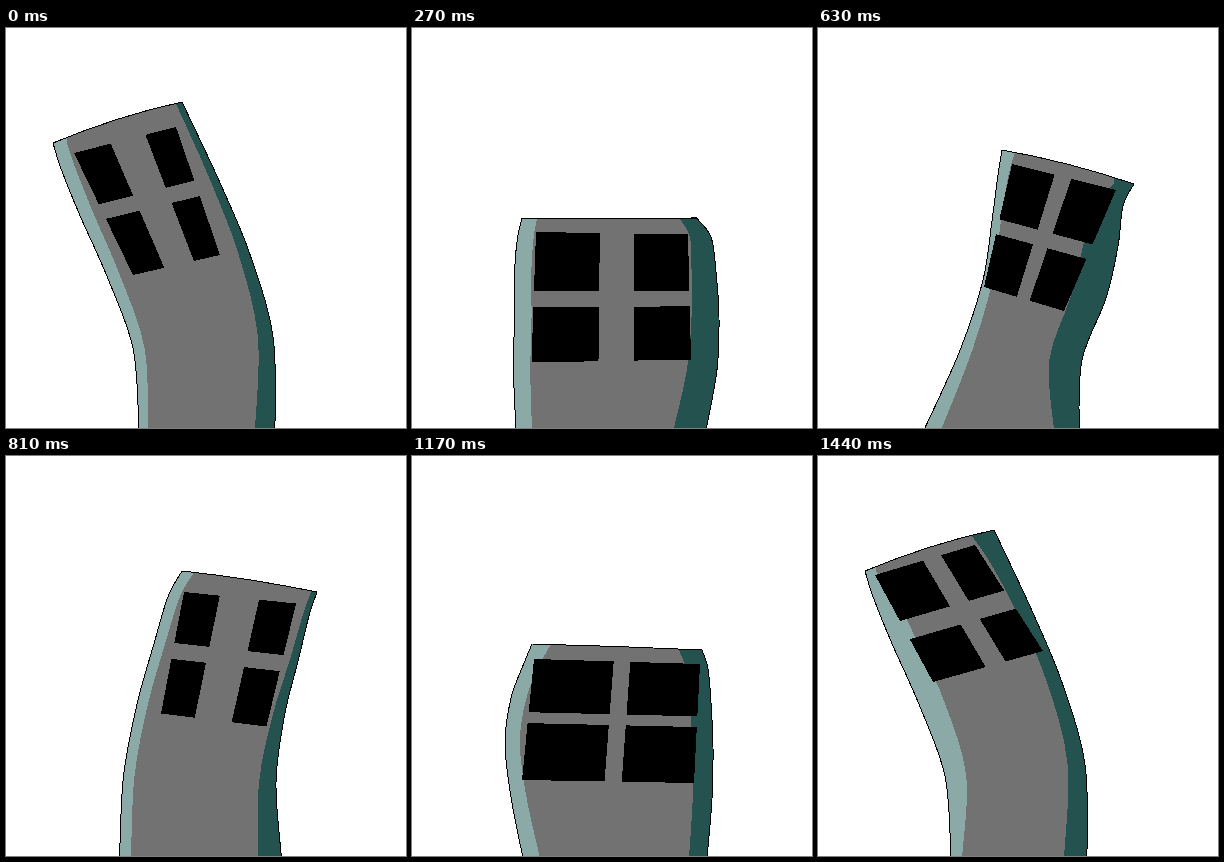
An HTML page for the animation above (1.53 s loop, 400 by 400 pixels).

```html
<!DOCTYPE html>
<html lang="en">
<head>
<meta charset="utf-8">
<title>Dancing tower</title>
<style>
html, body { margin: 0; width: 100%; height: 100%; overflow: hidden; background: #fff; }
svg { display: block; width: 100vw; height: 100vh; }
</style>
</head>
<body>
<svg viewBox="0 0 400 400" shape-rendering="crispEdges">
  <clipPath id="clip"><path id="clipShape"/></clipPath>
  <g clip-path="url(#clip)">
    <path id="wall" fill="#727272"/>
    <path id="light" fill="#8aa9a7"/>
    <path id="dark" fill="#24534f"/>
  </g>
  <path id="edge" fill="none" stroke="#000"/>
  <path id="panes" fill="#000"/>
</svg>
<script>
const STEP = 90, COUNT = 17, FLOOR = 402, MID = 397;

// left, right: height of the corner, then x at six levels down to the floor
// light, dark: width of the shaded side at top, middle and bottom
// block: corners of the window area, clockwise; gaps: its bars, across and down
const leanLeft = {
  left: [115, 47, 55, 74, 101, 127, 133], right: [74, 176, 190, 215, 244, 267, 269],
  light: [14, 14, 9], dark: [7, 10, 20],
  block: [68, 125, 170, 99, 214, 227, 127, 247], gaps: [.36, .7, .42, .54]
};
const leanEnd = {
  ...leanLeft, light: [11, 27, 11], dark: [27, 15, 23],
  block: [57, 119, 157, 89, 225, 195, 115, 226], gaps: [.48, .66, .43, .6]
};
const sink = {
  left: [157, 125, 133, 135, 136, 127, 110], right: [156, 266, 280, 283, 288, 292, 298],
  light: [12, 8, 14], dark: [5, 10, 27],
  block: [146, 170, 268, 173, 270, 288, 146, 294], gaps: [.3, .66, .42, .56]
};
const squash = {
  left: [224, 95, 78, 70, 69, 76, 98], right: [224, 303, 318, 325, 326, 318, 290],
  light: [18, 26, 18], dark: [30, 42, 38],
  block: [102, 238, 284, 240, 288, 375, 93, 375], gaps: [.54, .63, .48, .59]
};
const swell = {
  left: [192, 116, 97, 89, 86, 90, 122], right: [192, 300, 313, 317, 307, 294, 266],
  light: [14, 24, 14], dark: [38, 38, 36],
  block: [108, 205, 286, 210, 280, 363, 100, 363], gaps: [.54, .61, .5, .63]
};
const rise = {
  left: [122, 184, 180, 174, 165, 142, 106], right: [156, 316, 305, 300, 288, 264, 261],
  light: [14, 9, 17], dark: [20, 36, 25],
  block: [194, 136, 298, 162, 246, 283, 166, 259], gaps: [.41, .57, .45, .57]
};
const settle = {
  left: [190, 105, 97, 95, 95, 95, 96], right: [192, 291, 303, 310, 310, 304, 284],
  light: [14, 18, 16], dark: [19, 38, 18],
  block: [108, 211, 295, 213, 296, 358, 106, 364], gaps: [.49, .58, .53, .62]
};
const spring = {
  left: [188, 120, 112, 99, 93, 99, 111], right: [194, 290, 296, 299, 301, 300, 295],
  light: [19, 15, 17], dark: [23, 21, 18],
  block: [122, 203, 288, 208, 282, 327, 110, 324], gaps: [.48, .58, .44, .53]
};

function mirror(p) {
  const flip = ([y, ...xs]) => [y, ...xs.map(x => MID - x)];
  const [ax, ay, bx, by, cx, cy, dx, dy] = p.block;
  const [u0, u1, v0, v1] = p.gaps;
  return {
    ...p, left: flip(p.right), right: flip(p.left),
    block: [MID - bx, by, MID - ax, ay, MID - dx, dy, MID - cx, cy],
    gaps: [1 - u1, 1 - u0, v0, v1]
  };
}

const keys = [
  [0, leanLeft], [2, sink], [4, squash], [5, swell], [7, rise],
  [8, mirror(leanLeft)], [10, mirror(sink)], [11, settle], [12, squash],
  [13, spring], [15, mirror(rise)], [16, leanEnd]
];

const mix = (a, b, u) => a + (b - a) * u;

function poseAt(step) {
  const i = Math.max(1, keys.findIndex(k => k[0] >= step));
  const [s0, a] = keys[i - 1], [s1, b] = keys[i];
  const u = (step - s0) / (s1 - s0), pose = {};
  for (const part in a) pose[part] = a[part].map((v, j) => mix(v, b[part][j], u));
  return pose;
}

// Levels lie closer together near the roof, where the corners bend.
const side = ([top, ...xs]) =>
  xs.map((x, i) => [x, mix(top, FLOOR, (i / 5) ** 1.5)]);

// Moves a side inwards by a width that follows a parabola.
const seam = (pts, [a, b, c], dir) => pts.map(([x, y], i) => {
  const s = i / 5;
  const w = a * (1 - s) * (1 - 2 * s) + 4 * b * s * (1 - s) + c * s * (2 * s - 1);
  return [x + dir * w, y];
});

// Smooth curve through the points, continuing from the first one.
function curve(pts) {
  const at = i => pts[Math.max(0, Math.min(pts.length - 1, i))];
  const ctrl = (p, a, b, s) => p.map((v, c) => v + s * (b[c] - a[c]) / 6);
  return pts.slice(1).map((p, i) =>
    `C${ctrl(at(i), at(i - 1), p, 1)} ${ctrl(p, at(i), at(i + 2), -1)} ${p}`).join('');
}

const back = pts => [...pts].reverse();
const strip = (a, b) => `M${a[0]}${curve(a)}L${b[5]}${curve(back(b))}L${b[0][0]} 0H${a[0][0]}Z`;

function windows([ax, ay, bx, by, cx, cy, dx, dy], [u0, u1, v0, v1]) {
  const at = (u, v) => [mix(mix(ax, bx, u), mix(dx, cx, u), v),
    mix(mix(ay, by, u), mix(dy, cy, u), v)];
  const pane = (l, r, t, b) => `M${at(l, t)}L${at(r, t)}L${at(r, b)}L${at(l, b)}Z`;
  return [[0, v0], [v1, 1]].map(([t, b]) =>
    pane(0, u0, t, b) + pane(u1, 1, t, b)).join('');
}

const set = (id, d) => document.getElementById(id).setAttribute('d', d);

function draw(step) {
  const p = poseAt(step), left = side(p.left), right = side(p.right);
  const [l, r] = [left[0], right[0]];
  const arch = Math.abs(l[1] - r[1]) * .16;
  const roof = `Q${(l[0] + r[0]) / 2} ${(l[1] + r[1]) / 2 - arch} ${r}`;
  const body = `M${left[5]}${curve(back(left))}${roof}${curve(right)}Z`;
  ['clipShape', 'wall', 'edge'].forEach(id => set(id, body));
  set('light', strip(left, seam(left, p.light, 1)));
  set('dark', strip(right, seam(right, p.dark, -1)));
  set('panes', windows(p.block, p.gaps));
}

let shown = -1;
function tick() {
  const step = Math.floor(performance.now() / STEP) % COUNT;
  if (step !== shown) draw(shown = step);
  requestAnimationFrame(tick);
}
tick();
</script>
</body>
</html>
```
